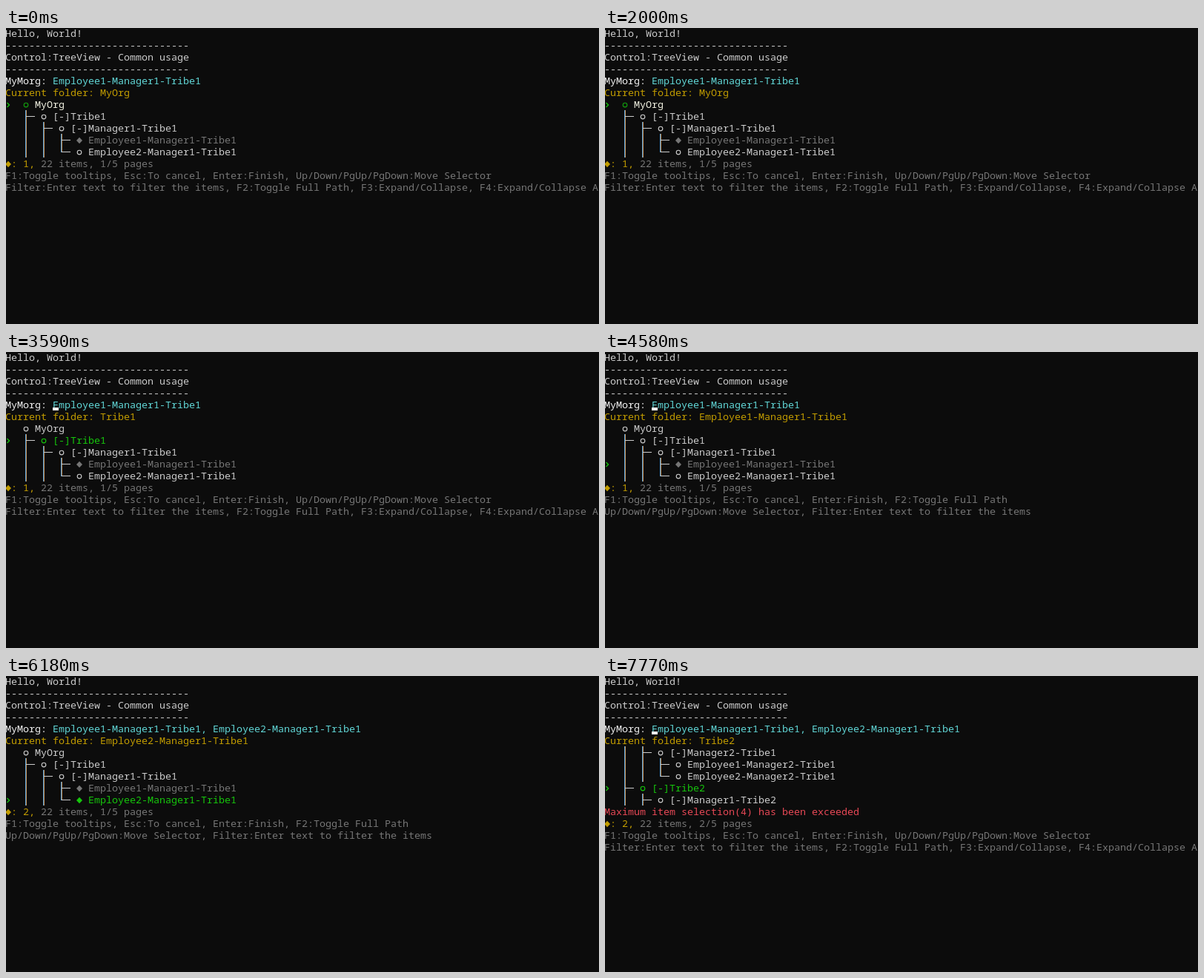
These frames come from a looping animation (800 px wide and 400 px high, 8000 ms). An HTML page with a canvas:

```html
<!DOCTYPE html>
<html lang="en">
<head>
<meta charset="utf-8">
<title>TreeView control</title>
<style>
  html, body { margin: 0; width: 100%; height: 100%; overflow: hidden; background: #0c0c0c; }
  canvas { display: block; }
</style>
</head>
<body>
<canvas id="stage" width="800" height="400"></canvas>
<script>
const ctx = document.getElementById('stage').getContext('2d');
const LOOP = 8000, CW = 8, CH = 16;
const BG = '#0c0c0c', TEXT = '#cccccc', WHITE = '#f2f2f2', GREY = '#767676', CYAN = '#61d6d6',
      YELLOW = '#c19c00', GREEN = '#13a10e', LIME = '#16c60c', RED = '#e74856';

const cellX = col => col * CW - 1;
const rowMid = row => row * CH + 8;

function put(col, row, text, color) {
  ctx.fillStyle = color;
  [...text].forEach((ch, i) => ctx.fillText(ch, cellX(col + i), row * CH + 12));
}

function ring(col, row, color) {
  ctx.strokeStyle = color;
  ctx.lineWidth = 1.15;
  ctx.beginPath();
  ctx.arc(cellX(col) + 4, rowMid(row), 2.8, 0, Math.PI * 2);
  ctx.stroke();
}

function diamond(col, row, color) {
  const x = cellX(col) + 4, y = rowMid(row);
  ctx.fillStyle = color;
  ctx.beginPath();
  ctx.moveTo(x, y - 4.2);
  ctx.lineTo(x + 4, y);
  ctx.lineTo(x, y + 4.2);
  ctx.lineTo(x - 4, y);
  ctx.fill();
}

function pointer(row) {
  const y = rowMid(row);
  ctx.strokeStyle = LIME;
  ctx.lineWidth = 1.3;
  ctx.beginPath();
  ctx.moveTo(1.5, y - 3);
  ctx.lineTo(4.5, y);
  ctx.lineTo(1.5, y + 3);
  ctx.stroke();
}

// Kinds of joint: '|' passes through, '+' branches, 'L' ends.
// The upright has a blue and an orange edge, as subpixel text rendering gives.
function joint(col, row, kind) {
  const x = cellX(col) + 3, top = row * CH - 1, h = kind === 'L' ? 9 : CH;
  ctx.fillStyle = '#5fa8e0';
  ctx.fillRect(x, top, 1, h);
  ctx.fillStyle = '#c08a50';
  ctx.fillRect(x + 1, top, 1, h);
  if (kind !== '|') {
    ctx.fillStyle = TEXT;
    ctx.fillRect(x + 1, top + 8, 12, 1);
  }
}

const node = (joints, name, open = true) => ({ joints, name, open });
const tree = [
  node('', 'MyOrg', false),
  node('+', 'Tribe1'),
  node('|+', 'Manager1-Tribe1'),
  node('||+', 'Employee1-Manager1-Tribe1', false),
  node('||L', 'Employee2-Manager1-Tribe1', false),
  node('|+', 'Manager2-Tribe1'),
  node('||+', 'Employee1-Manager2-Tribe1', false),
  node('||L', 'Employee2-Manager2-Tribe1', false),
  node('+', 'Tribe2'),
  node('|+', 'Manager1-Tribe2')
];
const FIXED = 3, PICKED = 4, PAGE = 5;

// Times at which the selector moves down one item.
const moves = [3190, 3780, 4380, 5370, 6580, 6780, 7170, 7370];
const PICK_AT = 5780, ERROR_AT = 7770;

// Times at which the cursor toggles, starting hidden.
const blinks = [600, 990, 1600, 2000, 2590, 3190, 3590, 4180, 4580, 5170, 5580, 6180, 6580];

const passed = (times, t) => times.filter(at => t >= at).length;

function drawNode(index, row, current, picked) {
  const { joints, name, open } = tree[index];
  const selected = index === current, fixed = index === FIXED;
  const col = 3 + joints.length * 3;
  [...joints].forEach((kind, i) => joint(3 + i * 3, row, kind));

  let color = selected ? LIME : TEXT;
  if (fixed) color = GREY;
  if (fixed || (index === PICKED && picked)) diamond(col, row, color);
  else ring(col, row, selected ? (index ? LIME : GREEN) : TEXT);
  if (selected && index === 0) color = '#f2f2e2';
  put(col + 2, row, (open ? '[-]' : '') + name, color);
  if (selected) pointer(row);
}

function drawFooter(row, leaf, picked, page) {
  diamond(0, row, YELLOW);
  put(1, row, `: ${picked ? 2 : 1},`, YELLOW);
  put(6, row, `22 items, ${page + 1}/5 pages`, GREY);
  const keys = 'F1:Toggle tooltips, Esc:To cancel, Enter:Finish, ';
  const move = 'Up/Down/PgUp/PgDown:Move Selector';
  const filter = 'Filter:Enter text to filter the items';
  const path = 'F2:Toggle Full Path';
  put(0, row + 1, keys + (leaf ? path : move), GREY);
  put(0, row + 2, leaf ? `${move}, ${filter}`
    : `${filter}, ${path}, F3:Expand/Collapse, F4:Expand/Collapse A`, GREY);
}

function draw(t) {
  const current = passed(moves, t), page = Math.floor(current / PAGE);
  const picked = t >= PICK_AT, failed = t >= ERROR_AT;

  ctx.fillStyle = BG;
  ctx.fillRect(0, 0, 800, 400);
  ctx.font = '13.3333px "Noto Sans Mono", "DejaVu Sans Mono", monospace';
  ctx.textBaseline = 'alphabetic';

  put(0, 0, 'Hello, World!', TEXT);
  put(0, 1, '-'.repeat(31), TEXT);
  put(0, 2, 'Control:TreeView - Common usage', TEXT);
  put(0, 3, '-'.repeat(31), TEXT);
  put(0, 4, 'MyMorg:', WHITE);
  put(8, 4, tree[FIXED].name + (picked ? ', ' + tree[PICKED].name : ''), CYAN);
  put(0, 5, 'Current folder: ' + tree[current].name, YELLOW);

  for (let i = 0; i < PAGE; i++) drawNode(page * PAGE + i, 6 + i, current, picked);

  if (failed) put(0, 11, 'Maximum item selection(4) has been exceeded', RED);
  const leaf = tree[current].name.startsWith('Employee');
  drawFooter(failed ? 12 : 11, leaf, picked, page);

  if (passed(blinks, t) % 2) {
    ctx.fillStyle = WHITE;
    ctx.fillRect(cellX(8), 75, CW, 4);
  }
}

const start = performance.now();
function tick() {
  draw((performance.now() - start) % LOOP);
  requestAnimationFrame(tick);
}
tick();
</script>
</body>
</html>
```
